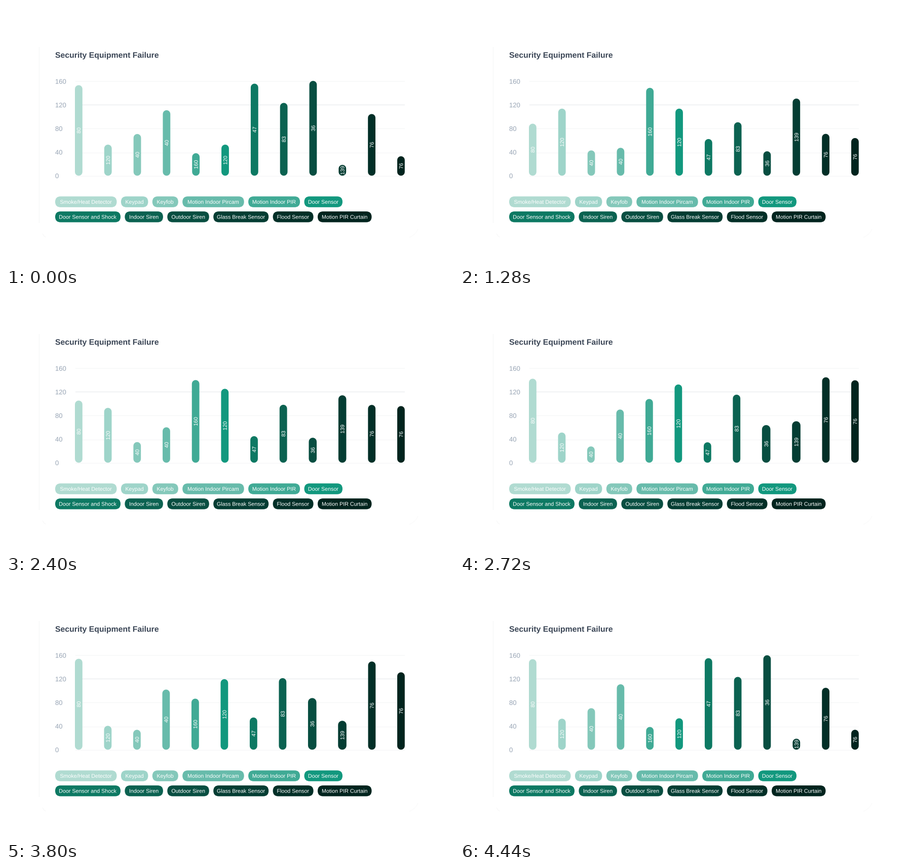
Write a matplotlib script that moves like this. It is 884x512 px and loops after 4480 ms.

```python
import numpy as np
import matplotlib.pyplot as plt
from matplotlib.animation import FuncAnimation
from matplotlib.patches import FancyBboxPatch, PathPatch
from matplotlib.textpath import TextPath
from matplotlib.transforms import Affine2D

W, H, DPI = 884, 512, 100
STEP, LOOP = 40, 4480
HOLD, MOVE = 500, 1000
PX = 72 / DPI
CAP = 0.716

COLORS = ["#b0dbd1", "#9ed4c9", "#84c8ba", "#67bbab", "#40aa95", "#12987e",
          "#0d7963", "#0b6251", "#084e41", "#043d33", "#022f27", "#01241e"]
VALUES = [80, 120, 40, 40, 160, 120, 47, 83, 36, 139, 76, 76]
NAMES = ["Smoke/Heat Detector", "Keypad", "Keyfob", "Motion Indoor Pircam",
         "Motion Indoor PIR", "Door Sensor", "Door Sensor and Shock",
         "Indoor Siren", "Outdoor Siren", "Glass Break Sensor",
         "Flood Sensor", "Motion PIR Curtain"]
PILL_WIDTHS = [121.5, 53.5, 51, 121.5, 102, 75.5,
               129, 75.5, 82.5, 109, 80, 106.5]

# Top edge of each bar in the three states
TOPS = np.array([
    [156.5, 274, 253, 206, 291, 274, 153.5, 191.5, 148, 314, 213.5, 297],
    [241, 195, 289, 288.5, 147.5, 195, 275, 234, 302.5, 168.5, 257, 257],
    [155.5, 291.5, 306, 219, 221.5, 178, 299, 194.5, 253, 270, 149, 156],
])
WIDTHS = np.full((3, 12), 14.8)
WIDTHS[2, 8:10] = 17
LEFT, RIGHT, BOTTOM = 136, 786.8, 335.5

fig = plt.figure(figsize=(W / DPI, H / DPI), dpi=DPI, facecolor="white")
ax = fig.add_axes([0, 0, 1, 1])
ax.set_xlim(0, W)
ax.set_ylim(H, 0)
ax.axis("off")


def place(patch, x, y, angle=0):
    flip = Affine2D().rotate_deg(angle).scale(1, -1).translate(x, y)
    patch.set_transform(flip + ax.transData)


def text(x, y, s, size, color, weight="normal", center=False):
    """Text on baseline y; centred text has its ink middle at (x, y)."""
    path = TextPath((0, 0), s, size=size,
                    prop={"family": "Liberation Sans", "weight": weight})
    if center:
        box = path.get_extents()
        shift = Affine2D().translate(-(box.x0 + box.x1) / 2, -CAP * size / 2)
        path = shift.transform_path(path)
    patch = PathPatch(path, fc=color, lw=0, zorder=4)
    ax.add_patch(patch)
    place(patch, x, y)
    return patch


def stroke(xs, ys, color, width, cap="butt", z=1):
    line, = ax.plot(xs, ys, color=color, lw=width * PX,
                    solid_capstyle=cap, zorder=z)
    line.set_snap(False)
    return line


def draw_card():
    stroke([65.5, 65.5], [81, 429], "#f4f5f5", 1)
    stroke([72, 74.5, 78], [450, 454, 457], "#f6f6f6", 1)
    a = np.linspace(0.3, 1.2, 12)
    stroke(786 + 28 * np.cos(a), 433 + 26 * np.sin(a), "#fafafa", 1)
    text(97, 102.3, "Security Equipment Failure", 15.8, "#3b4656", "bold")


def draw_axis():
    grid = [149, 195.5, 242.5, 290.5, 336.5]
    for k, y in enumerate(grid):
        strong = k == 1
        stroke([137, 787], [y, y], "#eceef0" if strong else "#f3f4f5",
               1.5 if strong else 1)
        text(97, 149 + 46.65 * k + 4.7, str(160 - 40 * k), 13.1, "#98a5b5")


def draw_legend():
    for row, top in enumerate([376.4, 406.1]):
        x = 97
        for k in range(6 * row, 6 * row + 6):
            w = PILL_WIDTHS[k]
            ax.add_patch(FancyBboxPatch(
                (x, top), w, 21.4, fc=COLORS[k], lw=0,
                boxstyle="round,pad=0,rounding_size=10.7"))
            text(x + w / 2, top + 10.7, NAMES[k], 10.7, "white", center=True)
            x += w + 8.4


draw_card()
draw_axis()
draw_legend()
bars = [stroke([0, 0], [0, 0], c, 1, "round", 3) for c in COLORS]
labels = [text(0, 0, str(v), 10.7, "white", center=True) for v in VALUES]

# cubic-bezier(.42, 0, .58, 1)
u = np.linspace(0, 1, 400)
CURVE_X = 1.26 * (1 - u) ** 2 * u + 1.74 * (1 - u) * u ** 2 + u ** 3
CURVE_Y = 3 * (1 - u) * u ** 2 + u ** 3


def ease(p):
    return np.interp(p, CURVE_X, CURVE_Y)


def update(i):
    state, local = divmod(i * STEP, HOLD + MOVE)
    p = ease((local - HOLD) / MOVE)
    after = (state + 1) % 3
    tops = TOPS[state] + (TOPS[after] - TOPS[state]) * p
    widths = WIDTHS[state] + (WIDTHS[after] - WIDTHS[state]) * p
    gap = (RIGHT - LEFT - widths.sum()) / 11
    centers = LEFT + np.cumsum(widths + gap) - gap - widths / 2
    for bar, label, x, top, w in zip(bars, labels, centers, tops, widths):
        bar.set_data([x, x], [top + w / 2, BOTTOM - w / 2])
        bar.set_linewidth(w * PX)
        place(label, x, (top + BOTTOM) / 2, 90)
    return bars + labels


anim = FuncAnimation(fig, update, frames=LOOP // STEP, interval=STEP,
                     repeat=True, repeat_delay=0)
plt.show()
```
